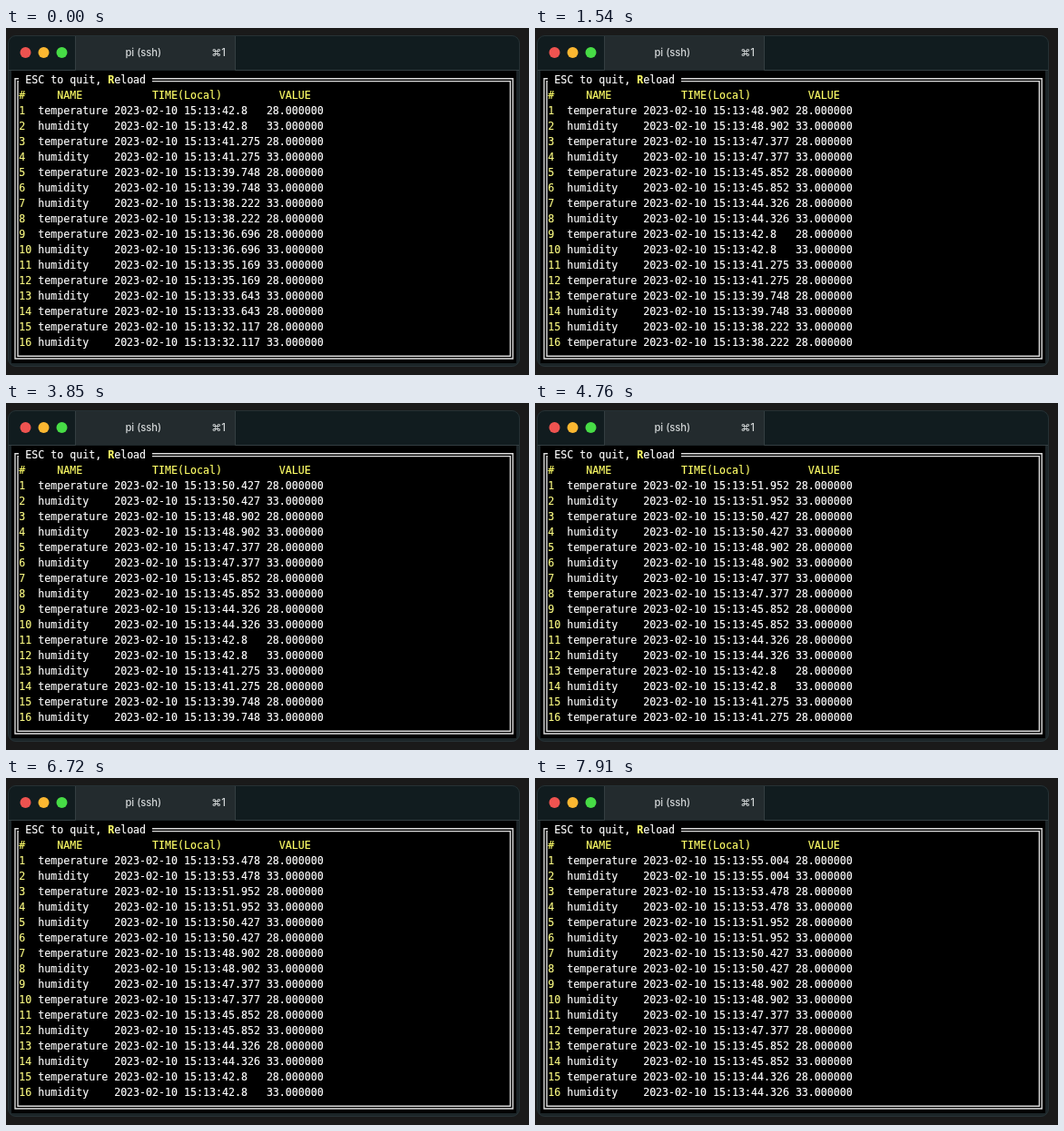
An HTML page for the animation above (8680 ms loop, 576x382 px).

```html
<!DOCTYPE html>
<html lang="en">
<head>
<meta charset="utf-8">
<title>Sensor log</title>
<style>
  html, body { margin: 0; width: 100%; height: 100%; overflow: hidden; background: #1a1a1a; }
  #stage { position: relative; width: 576px; height: 382px; overflow: hidden; }
  svg { position: absolute; inset: 0; }
  pre {
    position: absolute; left: 14.3px; margin: 0; color: #fff;
    font: 11.627px/17px "DejaVu Sans Mono", monospace;
    -webkit-text-stroke: .15px;
  }
  pre b { color: #ffff67; }
  .index { color: #f8f880; }
  #menu { top: 49px; }
  #head { top: 66px; color: #ffff67; }
  .screen { top: 83px; opacity: 0; }
  .title { font: 500 11.2px Inter, "DejaVu Sans", sans-serif; fill: #d3d7d8; }
</style>
</head>
<body>
<div id="stage">
  <svg width="576" height="382">
    <clipPath id="window"><rect x="2" y="8" width="564" height="365" rx="9"/></clipPath>
    <g clip-path="url(#window)">
      <path fill="#1c2528" d="M2 8h564v365H2z"/>
      <path fill="#111c1f" d="M2 8h564v38H2z"/>
      <path fill="#232b2e" d="M77 8h175v38H77z"/>
      <path fill="none" stroke="#343e41" d="M2 46.5H76.5V8M252.5 8V46.5H566"/>
      <path fill="#000" d="M6 47h556v322H6z"/>
    </g>
    <rect x="2.5" y="8.5" width="563" height="364" rx="8.5" fill="none" stroke="#263134"/>
    <circle cx="21.5" cy="27" r="6" fill="#ee5350"/>
    <circle cx="41.5" cy="27" r="6" fill="#fbb731"/>
    <circle cx="61.5" cy="27" r="6" fill="#47dc46"/>
    <text class="title" x="151.3" y="31" text-anchor="middle">pi (ssh)</text>
    <text class="title" x="242" y="31" text-anchor="end">⌘1</text>
    <path fill="none" stroke="#dcdcdc" stroke-width="1.4"
      d="M14 55.8H10V364H558.2V55.8H161M14 58.6H13V361.2H555.4V58.6H161"/>
  </svg>
  <pre id="menu"> ESC to quit, <b>R</b>eload</pre>
  <pre id="head">#     NAME           TIME(Local)         VALUE</pre>
</div>
<script>
const LOOP = 8680;
const SECONDS = [32.117, 33.643, 35.169, 36.696, 38.222, 39.748, 41.275, 42.8,
  44.326, 45.852, 47.377, 48.902, 50.427, 51.952, 53.478, 55.004];

// start time, newest sample, and which reading leads each pair (T or H)
const STEPS = [
  [0, 7, "TTTHTHHT"],
  [630, 10, "TTTTHTHT"],
  [1540, 11, "TTTTTHTH"],
  [3850, 12, "TTTTTTHT"],
  [4760, 13, "TTTHTTTH"],
  [6720, 14, "TTHTHTTT"],
  [7910, 15, "TTTHTHTT"],
];

const READINGS = { T: ["temperature", "28.000000"], H: ["humidity", "33.000000"] };

function row(number, kind, seconds) {
  const [name, value] = READINGS[kind];
  const time = `2023-02-10 15:13:${seconds.toFixed(3).replace(/0+$/, "")}`.padEnd(23);
  return `<span class="index">${String(number).padEnd(3)}</span>${name.padEnd(11)} ${time} ${value}`;
}

function screenRows(newest, leads) {
  return [...leads].flatMap((lead, i) => {
    const other = lead === "T" ? "H" : "T";
    const seconds = SECONDS[newest - i];
    return [row(2 * i + 1, lead, seconds), row(2 * i + 2, other, seconds)];
  }).join("\n");
}

const screens = STEPS.map(([, newest, leads]) => {
  const screen = document.createElement("pre");
  screen.className = "screen";
  screen.innerHTML = screenRows(newest, leads);
  document.getElementById("stage").append(screen);
  return screen;
});

// Every screen shares the same key times and is opaque only in its own step.
screens.forEach((screen, own) => {
  const keys = STEPS.map(([start], i) => ({
    offset: start / LOOP, opacity: i === own ? 1 : 0, easing: "steps(1, end)",
  }));
  keys.push({ ...keys.at(-1), offset: 1 });
  screen.animate(keys, { duration: LOOP, iterations: Infinity });
});
</script>
</body>
</html>
```
